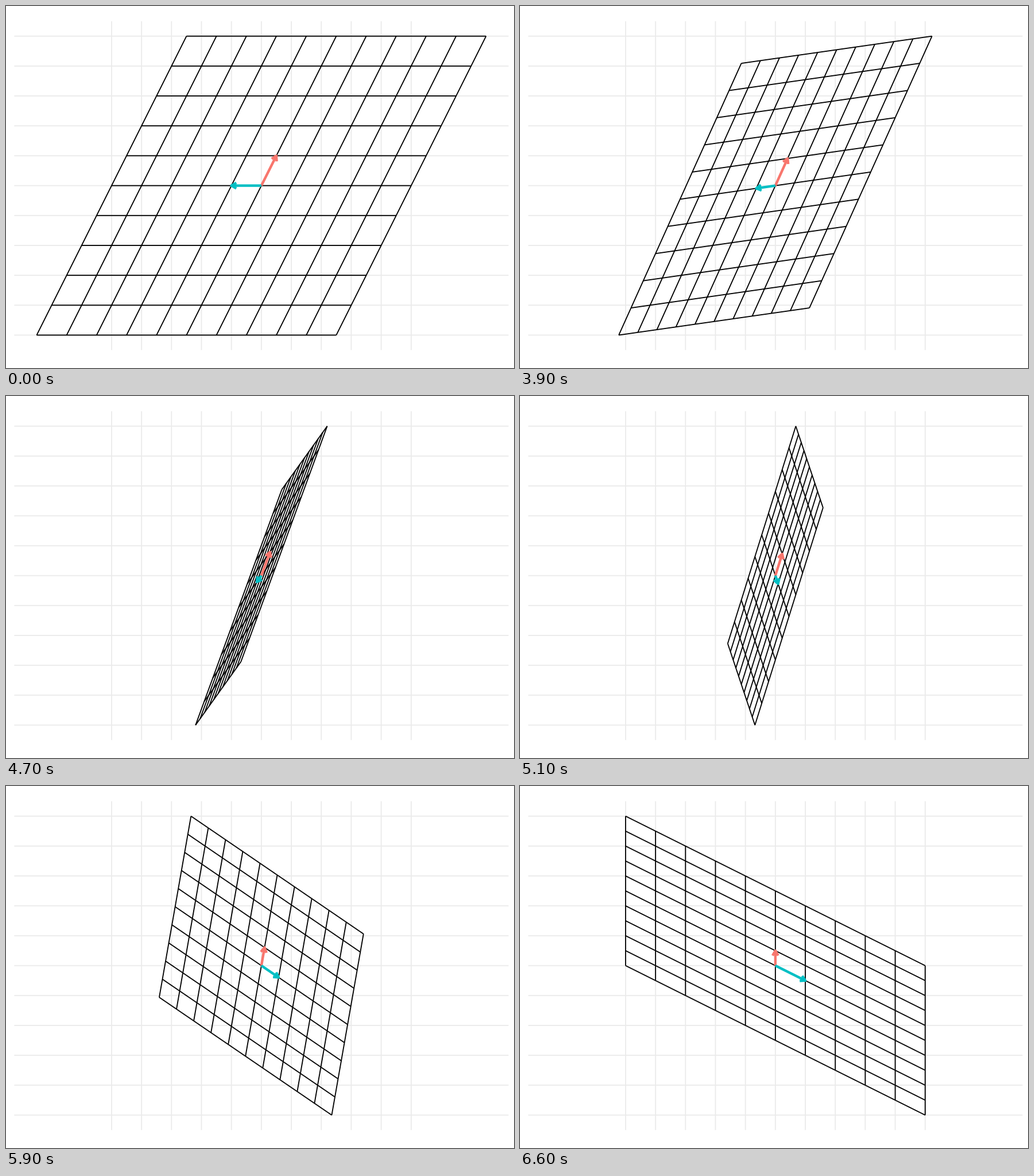
These frames come from a looping animation (885x632 px, 10000 ms). A matplotlib script:

```python
import numpy as np
import matplotlib.pyplot as plt
from matplotlib.animation import FuncAnimation
from matplotlib.collections import LineCollection

WIDTH, HEIGHT, DPI = 885, 632, 64
PX = 72 / DPI                      # one pixel in points
CENTER = np.array([444.89, 313.6])
UNIT = 52.19
THIN, THICK = 1.85 * PX, 4.4 * PX
HEAD_LENGTH, HEAD_ANGLE = 9.84, np.pi / 6
RED, TEAL = "#F8766D", "#00BFC4"

FRAMES, INTERVAL = 100, 100
HOLD, STEPS = 33, 33

# Columns are the images of the two basis vectors (teal, red).
START = np.array([[-1, 0.5], [0, 1]])
END = np.array([[1, 0], [-0.5, 0.5]])


def to_pixels(points):
    return CENTER + np.asarray(points) * [UNIT, -UNIT]


def lattice(x_reach, y_reach):
    ticks = range(-5, 6)
    vertical = [[(k, -y_reach), (k, y_reach)] for k in ticks]
    horizontal = [[(-x_reach, k), (x_reach, k)] for k in ticks]
    return np.array(vertical + horizontal, dtype=float)


class Arrow:
    def __init__(self, ax, color, zorder):
        style = dict(color=color, lw=THICK, zorder=zorder, snap=False,
                     solid_capstyle="butt", solid_joinstyle="round")
        self.shaft, = ax.plot([], [], **style)
        self.head, = ax.plot([], [], **style)

    def point_to(self, vector):
        tip = to_pixels(vector)
        back = CENTER - tip
        angle = np.arctan2(back[1], back[0])
        left, right = (
            tip + HEAD_LENGTH * np.array([np.cos(a), np.sin(a)])
            for a in (angle - HEAD_ANGLE, angle + HEAD_ANGLE))
        self.shaft.set_data(*np.transpose([CENTER, tip]))
        self.head.set_data(*np.transpose([left, tip, right]))


fig = plt.figure(figsize=(WIDTH / DPI, HEIGHT / DPI), dpi=DPI, facecolor="white")
ax = fig.add_axes([0, 0, 1, 1])
ax.set_xlim(0, WIDTH)
ax.set_ylim(HEIGHT, 0)
ax.axis("off")


def add_lines(segments, color, zorder):
    lines = LineCollection(segments, colors=color, linewidths=THIN,
                           capstyle="butt", zorder=zorder)
    lines.set_snap(False)
    ax.add_collection(lines, autolim=False)
    return lines


add_lines(to_pixels(lattice(8.25, 5.5)), "#EBEBEB", 1)
GRID = lattice(5, 5)
grid_lines = add_lines(to_pixels(GRID), "black", 2)
red_arrow = Arrow(ax, RED, 3)
teal_arrow = Arrow(ax, TEAL, 4)


def update(frame):
    progress = np.clip((frame - HOLD) / STEPS, 0, 1)
    matrix = START + (END - START) * progress
    grid_lines.set_segments(to_pixels(GRID @ matrix.T))
    teal_arrow.point_to(matrix[:, 0])
    red_arrow.point_to(matrix[:, 1])
    return grid_lines, red_arrow.shaft, red_arrow.head, teal_arrow.shaft, teal_arrow.head


animation = FuncAnimation(fig, update, frames=FRAMES, interval=INTERVAL,
                          init_func=lambda: update(0), repeat=True, repeat_delay=0)
plt.show()
```
